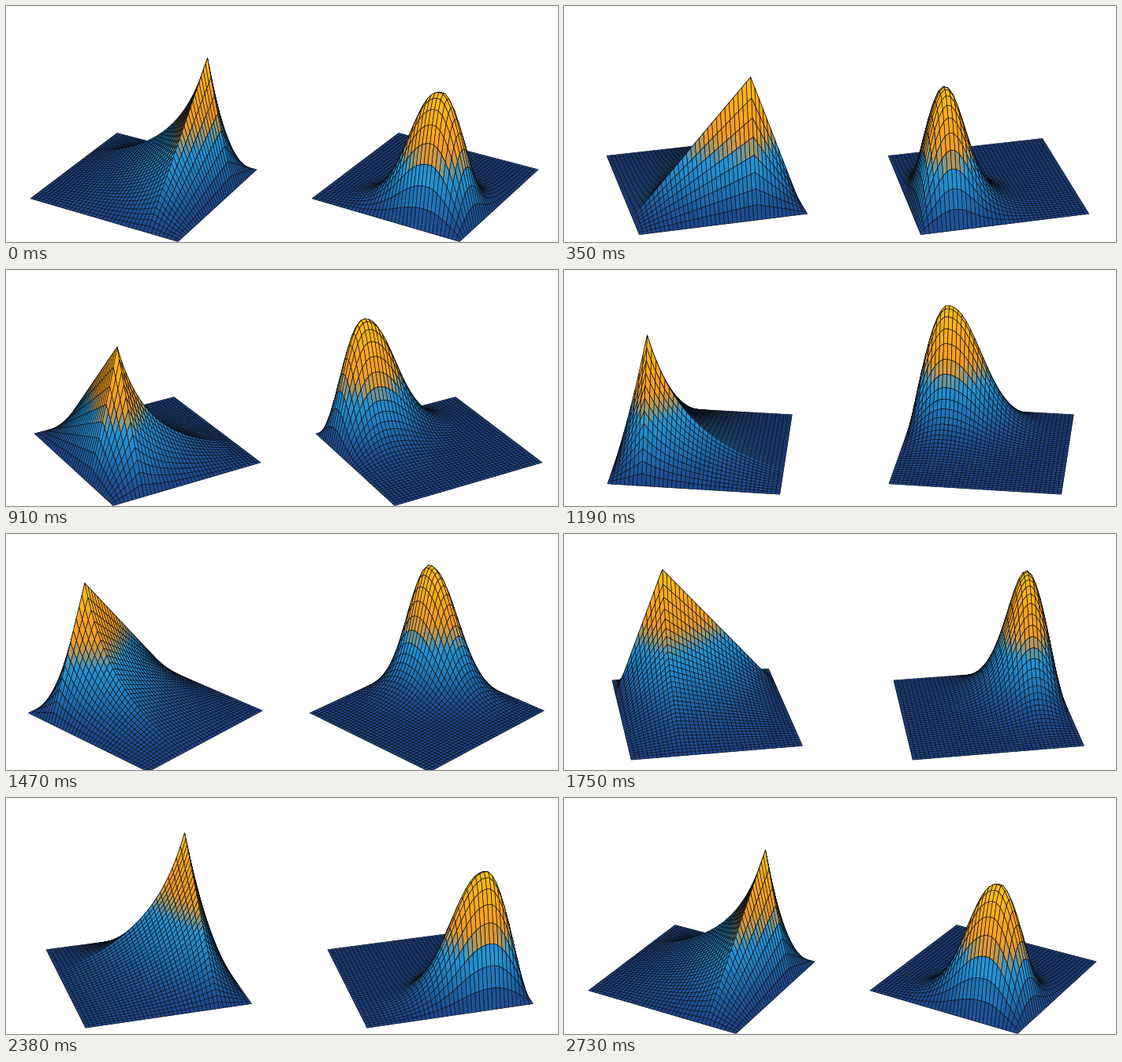
Animation of 700x300 px, one loop 2800 ms. Source, as a matplotlib script:

```python
import numpy as np
import matplotlib.pyplot as plt
from matplotlib.animation import FuncAnimation
from matplotlib.collections import PolyCollection
from matplotlib.colors import LinearSegmentedColormap

W, H, DPI = 700, 300, 100
FRAMES, INTERVAL = 40, 70
CELLS = 40

# Weak perspective camera, in pixels around the centre of the base square.
SCALE = 105.0        # half side of the base
TILT = 47.67         # vertical size of one unit of depth
LIFT = 153.8         # vertical size of a unit peak
HORIZON, DROP = 170.0, 56.0
DEPTH_SHRINK, HEIGHT_GROW = 0.0476, 0.0399
CENTRES = (177.0, 534.0)

CMAP = LinearSegmentedColormap.from_list("surface", [
    (0.00, "#1d458c"), (0.10, "#1e589c"), (0.20, "#1f70b4"),
    (0.31, "#2086c8"), (0.41, "#2594d6"), (0.50, "#9c9872"),
    (0.59, "#f09a26"), (0.75, "#ffa51c"), (1.00, "#ffc117"),
])


def two_sided(t, peak, rise, fall):
    """Join two profiles that run from 0 at -1 and 1 to 1 at the peak."""
    left = np.clip((t + 1) / (peak + 1), 0, 1)
    right = np.clip((1 - t) / (1 - peak), 0, 1)
    return np.where(t < peak, rise(left), fall(right))


def rational(degree, weight):
    """Rational profile; a larger weight pulls it closer to the base."""
    def profile(s):
        return s ** degree / (s ** degree + weight * (1 - s) ** degree)
    return profile


def round_top(slope):
    """Cubic with the given slope at 0 and a level end at 1."""
    def profile(s):
        return s * (slope + (3 - 2 * slope) * s + (slope - 2) * s ** 2)
    return profile


line = rational(1, 1)

grid = np.linspace(-1, 1, CELLS + 1)
U, V = np.meshgrid(grid, grid, indexing="ij")

kinked = (two_sided(U, 0.6, rational(1, 3.6), rational(1, 1.2))
          * two_sided(V, 0.4, line, line))
smooth = (two_sided(U, 0.52, rational(2, 5), round_top(1.5))
          * two_sided(V, -0.59, round_top(1.3), rational(2, 19)))
smooth *= 0.965 / smooth.max()


def corners(a):
    """Values at the four corners of every cell, one row per cell."""
    return np.stack([a[:-1, :-1], a[1:, :-1], a[1:, 1:], a[:-1, 1:]],
                    axis=-1).reshape(-1, 4)


def project(z, centre, angle):
    c, s = np.cos(angle), np.sin(angle)
    across = c * U - s * V
    depth = s * U + c * V
    size = 1 + DEPTH_SHRINK * depth - HEIGHT_GROW * z
    x = centre + SCALE * across / size
    y = HORIZON + (DROP - TILT * depth - LIFT * z) / size
    return x, y, depth


fig = plt.figure(figsize=(W / DPI, H / DPI), dpi=DPI, facecolor="white")
ax = fig.add_axes([0, 0, 1, 1])
ax.set_xlim(0, W)
ax.set_ylim(H, 0)
ax.axis("off")

surfaces = []
for z, centre in zip((kinked, smooth), CENTRES):
    mesh = PolyCollection([], edgecolors="#0a0d12", linewidths=0.45)
    ax.add_collection(mesh, autolim=False)
    colors = CMAP(corners(z / z.max()).mean(axis=1))
    surfaces.append((mesh, z, centre, colors))


def draw(i):
    angle = np.radians(-30 - 360 * i / (FRAMES - 1))
    for mesh, z, centre, colors in surfaces:
        x, y, depth = project(z, centre, angle)
        order = np.argsort(-corners(depth).mean(axis=1), kind="stable")
        quads = np.stack([corners(x), corners(y)], axis=-1)
        mesh.set_verts(quads[order])
        mesh.set_facecolor(colors[order])
    return [s[0] for s in surfaces]


anim = FuncAnimation(fig, draw, frames=FRAMES, interval=INTERVAL,
                     repeat=True, repeat_delay=0, blit=False)
plt.show()
```
